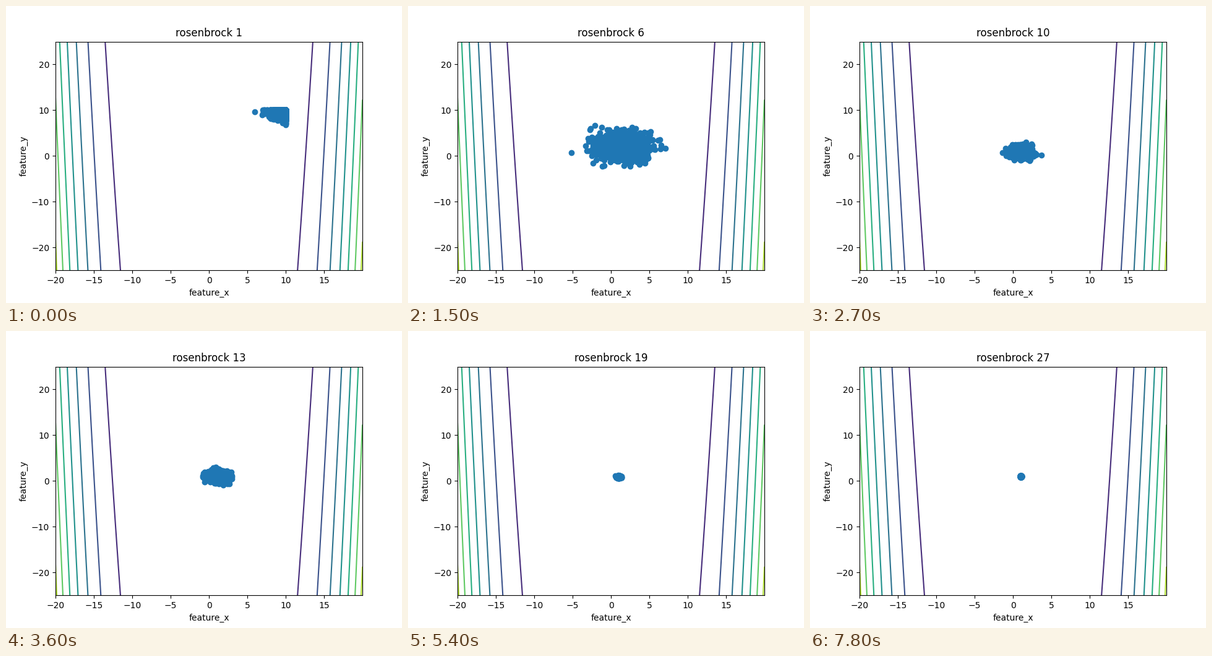
Write a matplotlib script that moves like this. It is 640 by 480 pixels and loops after 8000 ms.

```python
import numpy as np
import matplotlib.pyplot as plt
from matplotlib.animation import FuncAnimation

TICK_MS = 100
TICKS_PER_STEP = 3
TICKS = 80
SAMPLES = 900
BOUND = 10  # samples are clipped to this search box

# Search distribution at a few steps: mean x, mean y, deviation x, deviation y.
# Steps in between are interpolated.
KEYS = {
    1: (10, 10, 1.05, 1.05),
    3: (3.2, 9.6, 1.15, 1.15),
    6: (1.4, 2.1, 1.75, 1.55),
    8: (1.3, 0.9, 1.75, 1.6),
    10: (1.0, 0.87, 0.72, 0.63),
    15: (1.0, 1.2, 0.6, 0.59),
    19: (1.0, 0.89, 0.125, 0.1),
    27: (1.02, 1.0, 0.03, 0.05),
}


def rosenbrock(x, y):
    return (1 - x) ** 2 + 100 * (y - x ** 2) ** 2


def distribution(step):
    values = [np.interp(step, list(KEYS), column)
              for column in zip(*KEYS.values())]
    return np.array(values[:2]), np.array(values[2:])


def samples(step):
    """Normal samples: evenly ranked radii at seeded random angles."""
    rank = (np.arange(SAMPLES) + 0.5) / SAMPLES
    radius = np.sqrt(-2 * np.log(rank))
    angle = np.random.default_rng(step).uniform(0, 2 * np.pi, SAMPLES)
    unit = np.column_stack([radius * np.cos(angle), radius * np.sin(angle)])
    mean, deviation = distribution(step)
    return np.minimum(mean + deviation * unit, BOUND)


fig, ax = plt.subplots(figsize=(6.4, 4.8), dpi=100)
x_max, y_max = 19.99, 24.99
grid_x, grid_y = np.meshgrid(np.linspace(-20, x_max, 500),
                             np.linspace(-25, y_max, 500))
ax.contour(grid_x, grid_y, rosenbrock(grid_x, grid_y))
ax.set(xlim=(-20, x_max), ylim=(-25, y_max),
       xlabel="feature_x", ylabel="feature_y")
title = ax.set_title("rosenbrock 1")
dots = ax.scatter(*samples(1).T, color="C0")


def update(tick):
    step = tick // TICKS_PER_STEP + 1
    dots.set_offsets(samples(step))
    title.set_text(f"rosenbrock {step}")
    return dots, title


anim = FuncAnimation(fig, update, frames=TICKS, interval=TICK_MS,
                     repeat=True, repeat_delay=0)
plt.show()
```
